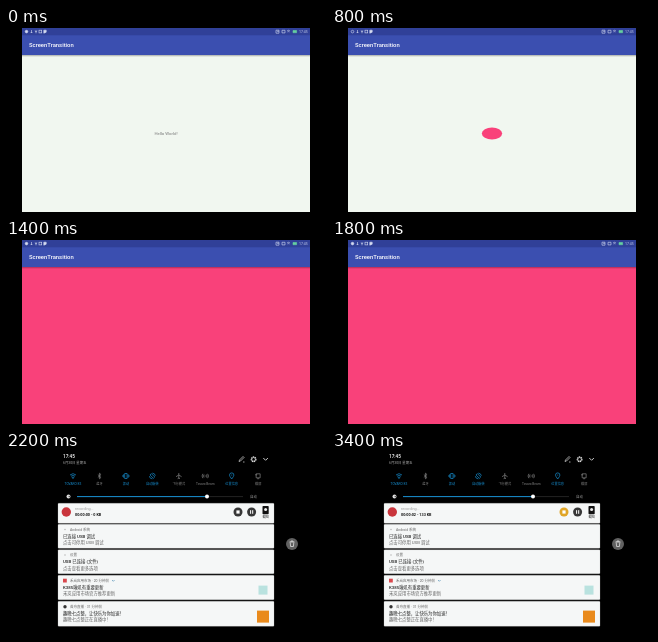
Write an HTML page that moves like this. It is 320 px wide and 184 px high and loops after 3600 ms.

```html
<!DOCTYPE html>
<html lang="zh-CN">
<head>
<meta charset="utf-8">
<style>
html, body { margin: 0; width: 100%; height: 100%; overflow: hidden; background: #000; }
svg { display: block; width: 100vw; height: 100vh; }
text { font-family: Roboto, "Noto Sans CJK SC", "Noto Sans CJK", sans-serif; }
</style>
</head>
<body>
<svg id="stage" viewBox="0 0 320 184">
  <defs>
    <linearGradient id="shade" x2="0" y2="1">
      <stop stop-color="#000" stop-opacity=".3"/>
      <stop offset="1" stop-color="#000" stop-opacity="0"/>
    </linearGradient>
  </defs>
  <g id="app">
    <rect id="page" x="16" y="27" width="288" height="157"/>
    <rect x="16" y="27" width="288" height="2" fill="url(#shade)"/>
    <rect id="bar" x="16" y="7" width="288" height="20"/>
    <rect id="status" x="16" width="288" height="7.3"/>
    <text x="23" y="19.4" font-size="5.9" font-weight="500" fill="#fff">ScreenTransition</text>
    <text id="hello" x="160" y="107.1" font-size="4.3" text-anchor="middle" fill="#777">Hello World!</text>
    <ellipse id="blob" cx="160" cy="105.5" fill="#f9417a"/>
    <g fill="none" stroke="#d4daf0" stroke-width=".6">
      <circle id="dot" cx="20.5" cy="3.6" r="1.3"/>
      <path d="M25.5 2v3M24.7 4l.8 1 .8-1M30 2v3.3M28.8 3l1.2 1 1.2-1"/>
      <rect x="33" y="2.2" width="2.7" height="2.7"/>
      <path d="M37.8 2.2h2.4v2l-2.4 1z" fill="#d4daf0"/>
      <path d="M270 2.2h3v3h-3zM271 3.3h2M276 2.3h3v2.6h-3zM281 3q1.5-1.4 3 0M281.7 4q.8-.8 1.6 0"/>
      <path d="M287 2.5h3.6v2.2H287z" fill="#65d0a0" stroke="#65d0a0"/>
    </g>
    <text x="293" y="5" font-size="3.5" fill="#c5cdea">17:45</text>
  </g>
  <g id="panel">
    <g id="top"></g>
    <g id="cards"></g>
    <circle cx="286" cy="92" r="6" fill="#616161"/>
    <path d="M283.5 90h5M285 90v-1h2v1M284.2 90.5l.4 4h2.8l.4-4" fill="none" stroke="#eee" stroke-width=".7"/>
  </g>
</svg>
<script>
const $ = id => document.getElementById(id);
const set = (el, attrs) => Object.entries(attrs).forEach(([k, v]) => el.setAttribute(k, v));
const show = (el, on) => el.style.display = on ? '' : 'none';

const label = (x, y, size, str, fill, extra = '') =>
  `<text x="${x}" y="${y}" font-size="${size}" fill="${fill}" ${extra}>${str}</text>`;
const line = (d, color, width = .7) =>
  `<path d="${d}" fill="none" stroke="${color}" stroke-width="${width}"/>`;
const square = (x, y, size, fill) =>
  `<rect x="${x}" y="${y}" width="${size}" height="${size}" fill="${fill}"/>`;
const circle = (x, y, r, fill) => `<circle cx="${x}" cy="${y}" r="${r}" fill="${fill}"/>`;

// Quick settings: label, active, icon around its own centre
const toggles = [
  ['TOVARO-X5', 1, 'M-3-1Q0-3.7 3-1M-2 .3Q0-1.5 2 .3M-.9 1.5Q0 .6 .9 1.5L0 2.6z'],
  ['蓝牙', 0, 'M-1.6-1.4L1.6 1.4 0 2.8V-2.8L1.6-1.4-1.6 1.4'],
  ['振动', 1, 'M-1.2-2.5h2.4v5h-2.4zM-2.3-1.7v3.4M2.3-1.7v3.4M-3.2-.7v1.4M3.2-.7v1.4'],
  ['自动旋转', 1, 'M-1-2.4L2.4 1 1 2.4-2.4-1zM0-2.9Q2.6-2.7 3-.2M0 2.9Q-2.6 2.7-3 .2'],
  ['飞行模式', 0, 'M0-3V2.7M-2.8 .7L0-1 2.8 .7M-1.2 2.7L0 2 1.2 2.7'],
  ['Tovaro Beam', 0, 'M-1.2-1.5Q-2.2 0-1.2 1.5M1.2-1.5Q2.2 0 1.2 1.5M-2.4-2.2Q-4 0-2.4 2.2M2.4-2.2Q4 0 2.4 2.2M0-.5v1'],
  ['位置信息', 1, 'M0 3Q-2.2 .2-2.2-.9A2.2 2.2 0 0 1 2.2-.9Q2.2 .2 0 3zM-.5-.9h1'],
  ['截屏', 0, 'M-2-2.2h4V1.8h-4zM-3-1.2h2M-1 2.7h2']
];

$('top').innerHTML =
  label(57, 6.4, 4.7, '17:45', '#fff', 'font-weight="500"') +
  label(57, 11.8, 3.4, '6月30日 星期五', '#aaa') +
  line('M233 9.5l.5-1.5 3.5-3.5 1 1-3.5 3.5zM237 10h1.5', '#ddd') +
  `<circle cx="247.6" cy="7.3" r="2.4" fill="none" stroke="#ddd" stroke-width="1.1" stroke-dasharray="1.3 .58"/>` +
  `<circle cx="247.6" cy="7.3" r="1.8" fill="none" stroke="#ddd" stroke-width=".7"/>` +
  line('M257.3 6l2.3 2.3L261.9 6', '#ddd', .9) +
  toggles.map(([name, on, d], i) => {
    const x = 67 + 26.45 * i, color = on ? '#168ed0' : '#858585';
    return `<g transform="translate(${x} 24)">${line(d, color)}</g>` +
      label(x, 33, 3.2, name, color, 'text-anchor="middle"');
  }).join('') +
  line('M71 44.6H237', '#333') + line('M71 44.6H201', '#168ed0', 1) +
  circle(62.5, 44.6, 2, '#ddd') + circle(63.3, 44.6, .8, '#555') +
  circle(201, 44.6, 2, '#fff') +
  label(247.5, 45.9, 3.5, '自动', '#999', 'text-anchor="middle"');

// Notification: top edge, height, header icon, source, title, body, picture
const notes = [
  [72.3, 24, circle(59, 5.2, .8, '#bbb'), 'Android 系统', '已连接 USB 调试', '点击可停用 USB 调试', ''],
  [97.8, 24, circle(59, 5.2, .8, '#bbb'), '设置', 'USB 已连接 (文件)', '点击查看更多选项', ''],
  [123.3, 24.5, square(57, 3.4, 3.8, '#d9484d'), '禾岚应用市场 · 20 分钟前',
    'K385啾叽有重要更新', '禾岚应用市场官方推荐更新',
    square(252.5, 10.3, 9, '#b9e2df') + line('M106 4.7l1.3 1.3 1.3-1.3', '#3b82ad', .6)],
  [149.3, 25, circle(59, 5.5, 1.7, '#333'), '苔舟直播 · 31 分钟前',
    '趣晚七点整，让快乐为你加速！', '趣晚七点整正在直播中！', square(251, 9.3, 12, '#e98a1c')]
];
const card = (y, h, inner, id) =>
  `<g id="${id}" transform="translate(0 ${y})"><rect x="52" width="216" height="${h}" rx=".7"
    fill="#f5f7f7" stroke="#bbb" stroke-width=".25"/>${inner}</g>`;

// Later notes lie beneath earlier ones
$('cards').innerHTML = notes.map(([y, h, icon, from, title, body, pic], i) =>
  card(y, h, icon + label(64, 6.6, 3.5, from, '#666') +
    label(57, 13.7, 4.35, title, '#222', 'font-weight="500"') +
    label(57, 20, 4.35, body, '#666') + pic, 'note' + i)
).reverse().join('') +
  card(51.3, 20, circle(60.3, 8.7, 4.7, '#c9353c') +
    label(69, 7, 3.7, 'recording...', '#999') +
    label(69, 13, 3.75, '', '#111', 'id="clock" font-weight="700"') +
    `<g id="buttons">${circle(232, 8.7, 4.5, 'currentColor')}${circle(245.6, 8.7, 4.5, '#373737')}</g>` +
    square(230.4, 7.1, 3.2, '#fff') +
    line('M244.6 6.9v3.6M246.7 6.9v3.6', '#fff', 1) +
    '<rect x="256.5" y="2.7" width="6.2" height="8.2" rx=".7" fill="#111"/>' +
    circle(259.6, 6.3, 1.5, '#eee') +
    label(259.6, 14.6, 3.2, '截图', '#222', 'text-anchor="middle"'), 'recorder');

function drawApp(step) {
  const light = step === 2 ? 1 : step === 3 ? .5 : 0;
  const mix = (a, b) => `rgb(${a.map((v, i) => Math.round(v + (b[i] - v) * light))})`;
  set($('status'), { fill: mix([48, 64, 152], [76, 91, 168]) });
  set($('bar'), { fill: mix([59, 79, 176], [83, 99, 181]) });
  set($('page'), { fill: step >= 7 ? '#f9417a' : '#f1f7f0' });
  set($('dot'), { fill: [4, 6, 8].includes(step) ? 'none' : '#d4daf0' });
  show($('hello'), step < 2);
  show($('blob'), step >= 2 && step < 7);
  const k = Math.max(0, Math.min(1, (step - 2) / 4));
  set($('blob'), { rx: 11.6 - 2.9 * k, ry: 3.2 + 5.5 * k });
}

function drawPanel(step) {
  const folded = step === 10;
  [0, 0, 18, 41].forEach((lift, i) =>
    set($('note' + i), { transform: `translate(0 ${notes[i][0] - (folded ? lift : 0)})` }));
  const [sec, kb] = step < 13 ? [0, 0] : step < 17 ? [1, 3] : [2, 133];
  $('clock').textContent = folded ? 'recording... - Starting' : `00:00:0${sec} - ${kb} KB`;
  set($('buttons'), { color: step === 17 ? '#e0a526' : '#373737' });
}

function frame(now) {
  const step = Math.floor(now % 3600 / 200);
  const inApp = step < 10;
  show($('app'), inApp);
  show($('panel'), !inApp);
  (inApp ? drawApp : drawPanel)(step);
  requestAnimationFrame(frame);
}
requestAnimationFrame(frame);
</script>
</body>
</html>
```
